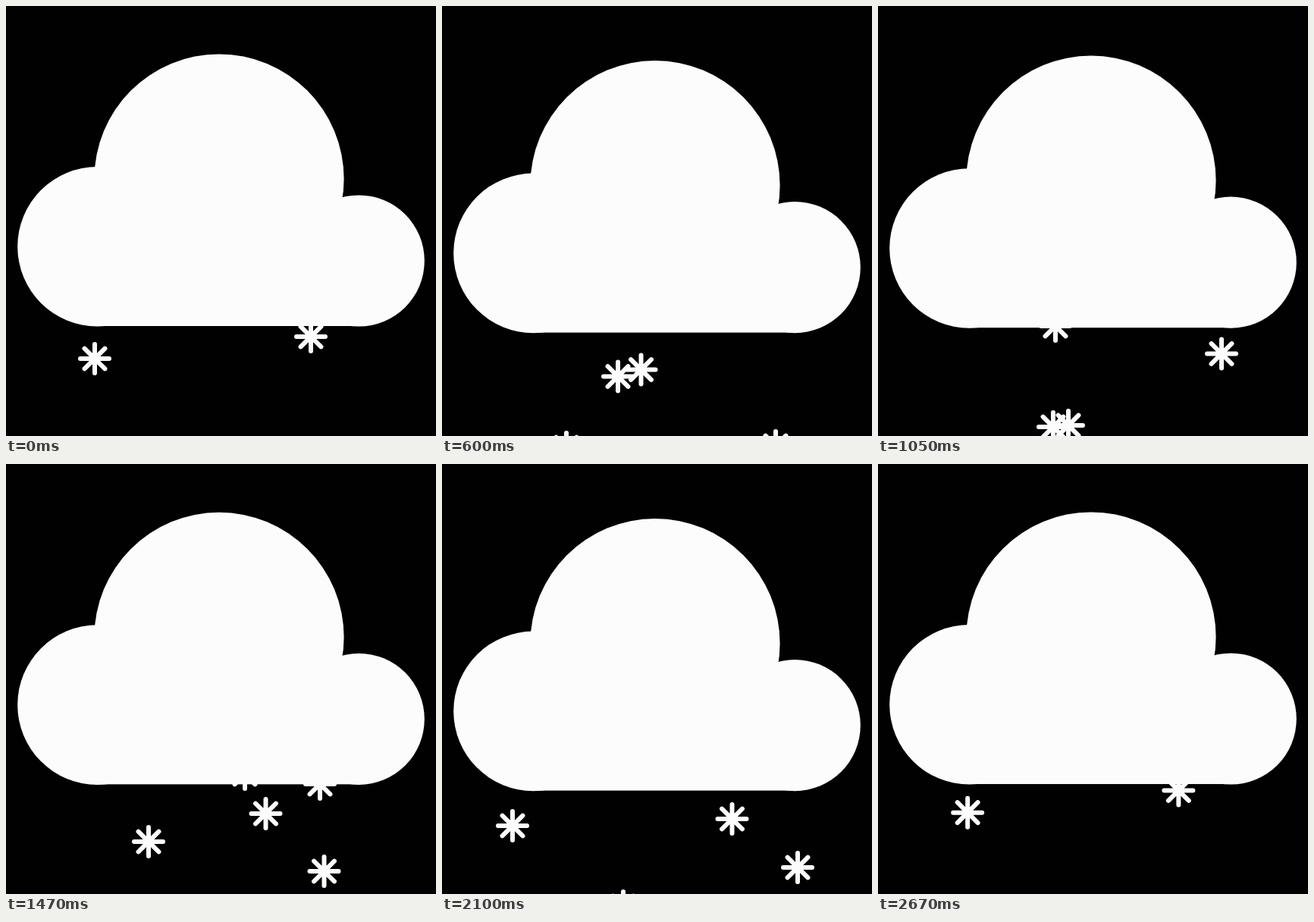
These frames come from a looping animation (567 by 567 pixels, 2.7 s). An HTML page with a canvas:

```html
<!DOCTYPE html>
<html lang="en">
<head>
<meta charset="utf-8">
<title>Snow cloud</title>
<style>
  html, body { margin: 0; width: 100%; height: 100%; overflow: hidden; background: #010101; }
  canvas { display: block; width: 567px; height: 567px; }
</style>
</head>
<body>
<canvas id="stage" width="567" height="567"></canvas>
<script>
const ctx = document.getElementById('stage').getContext('2d');
const LOOP = 2700, STEP = 30, BOB = 1350;

// Each flake drifts through points of [ms, x, y] and keeps its speed beyond them.
const flakes = [
  [[0, 117, 465], [300, 117, 520], [600, 164, 582]],
  [[0, 402, 436], [300, 446, 497], [600, 440, 580]],
  [[300, 275, 439], [600, 232, 488.5], [1050, 251, 553]],
  [[300, 241, 424], [600, 262.5, 479.5], [1050, 231, 555]],
  [[1050, 234, 422], [1470, 188, 498], [1710, 197.5, 537], [2100, 239, 583]],
  [[870, 446, 424], [1050, 453, 458.5], [1470, 419.5, 537], [1710, 393, 561]],
  [[1470, 342.5, 461], [1710, 346.5, 535]],
  [[1470, 315, 409], [1710, 343, 424], [2100, 382.5, 468], [2640, 388, 590]],
  [[1470, 414, 422], [1710, 463, 458], [2100, 469, 532]],
  [[1710, 84, 397], [2100, 93, 477], [2640, 165, 590]]
];

const chord = (a, b, axis) => (b[axis] - a[axis]) / (b[0] - a[0]);

function slope(path, i, axis) {
  const last = path.length - 1;
  if (i > 0 && i < last) return chord(path[i - 1], path[i + 1], axis);
  const inner = i ? last - 1 : 1;
  const edge = chord(path[i], path[inner], axis);
  return last < 2 ? edge : 1.5 * edge - 0.5 * slope(path, inner, axis);
}

function coordinate(path, t, axis) {
  const last = path.length - 1;
  const end = t <= path[0][0] ? 0 : last;
  if (t <= path[0][0] || t >= path[last][0])
    return path[end][axis] + (t - path[end][0]) * slope(path, end, axis);
  const i = path.findIndex(p => p[0] > t) - 1;
  const a = path[i], b = path[i + 1], span = b[0] - a[0];
  const u = (t - a[0]) / span, v = 1 - u;
  return a[axis] * v * v * (1 + 2 * u) + b[axis] * u * u * (3 - 2 * u) +
    span * u * v * (slope(path, i, axis) * v - slope(path, i + 1, axis) * u);
}

function drawFlake(path, t) {
  const x = coordinate(path, t, 1), y = coordinate(path, t, 2), arm = 19;
  if (y < 394 || y > 588) return;
  ctx.beginPath();
  for (let k = 0; k < 4; k++) {
    const dx = arm * Math.cos(k * Math.PI / 4), dy = arm * Math.sin(k * Math.PI / 4);
    ctx.moveTo(x - dx, y - dy);
    ctx.lineTo(x + dx, y + dy);
  }
  ctx.stroke();
}

function disc(x, y, r) {
  ctx.beginPath();
  ctx.arc(x, y, r, 0, Math.PI * 2);
  ctx.fill();
}

function drawCloud(t) {
  const phase = 1 - Math.abs((t % BOB) / BOB * 2 - 1);
  ctx.save();
  ctx.translate(0, 10.9 * phase * phase);
  disc(120.5, 317.3, 105.3);
  disc(281, 228, 164.6);
  disc(465.2, 336, 86.6);
  ctx.fillRect(120, 260, 345, 162);
  ctx.restore();
}

function draw(now) {
  const t = Math.floor((now % LOOP) / STEP) * STEP;
  ctx.fillStyle = '#010101';
  ctx.fillRect(0, 0, 567, 567);
  ctx.strokeStyle = ctx.fillStyle = '#fcfcfc';
  ctx.lineWidth = 6;
  ctx.lineCap = 'round';
  for (const path of flakes) {
    drawFlake(path, t);
    drawFlake(path, t - LOOP);
  }
  drawCloud(t);
}

const start = performance.now();
function tick() {
  draw(performance.now() - start);
  requestAnimationFrame(tick);
}
tick();
</script>
</body>
</html>
```
